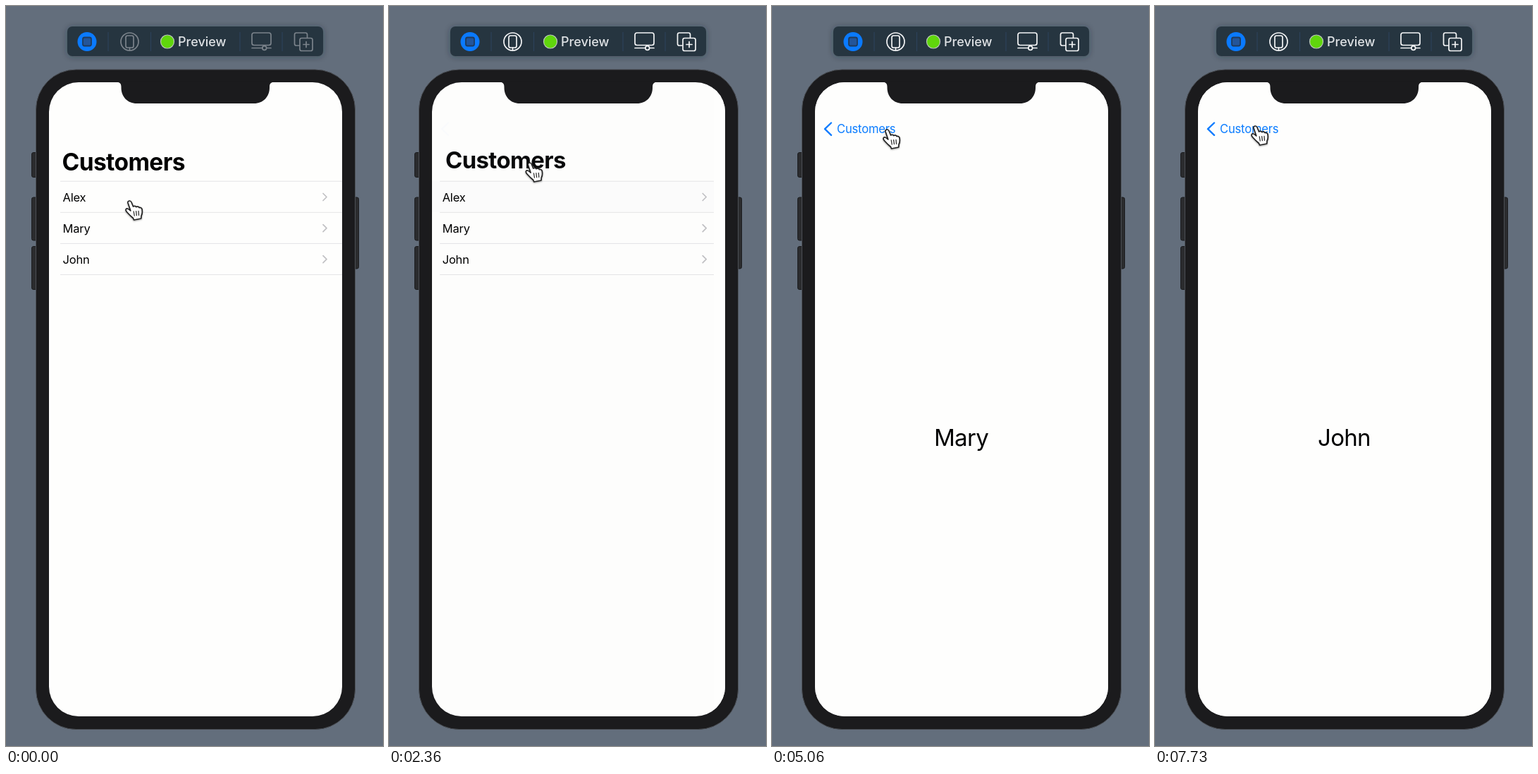
These frames come from a looping animation (535x1048 px, 8000 ms). An HTML page:

```html
<!DOCTYPE html>
<html lang="en">
<head>
<meta charset="utf-8">
<title>Customer list</title>
<style>
  html, body { margin: 0; width: 100%; height: 100%; overflow: hidden; background: #636e7c; }
  svg { display: block; width: 100%; height: 100%; }
  text { font-family: Inter, Roboto, sans-serif; }
  .line { fill: none; stroke-linecap: round; stroke-linejoin: round; }
  .row text { font-size: 16.5px; letter-spacing: -.2px; }
  .large { font-size: 33.5px; font-weight: 700; letter-spacing: -.6px; }
  .back-label { font-size: 16.6px; letter-spacing: -.2px; fill: #0a7cff; }
  .detail-name { font-size: 33px; letter-spacing: -.7px; text-anchor: middle; }
  .status { font-size: 18px; font-weight: 500; fill: #dfe2e5; }
</style>
</head>
<body>
<svg viewBox="0 0 535 1048" xmlns="http://www.w3.org/2000/svg">
  <defs>
    <clipPath id="screen"><rect x="61" y="108" width="416" height="898" rx="42"/></clipPath>
    <filter id="barShadow" x="-10%" y="-50%" width="120%" height="200%">
      <feDropShadow dx="0" dy="1" stdDeviation="5" flood-color="#1c2630" flood-opacity=".4"/>
    </filter>
    <filter id="handShadow" x="-30%" y="-30%" width="160%" height="170%">
      <feDropShadow dx="0" dy="1" stdDeviation="1" flood-opacity=".4"/>
    </filter>
  </defs>

  <rect width="535" height="1048" fill="#636e7c"/>

  <!-- toolbar -->
  <rect x="87" y="29" width="363" height="42" rx="7" fill="#28343f" filter="url(#barShadow)"/>
  <path d="M145 37V64M205.500 37V64M332 37V64M392 37V64" stroke="#2c425a" stroke-width="1.2"/>
  <circle cx="115" cy="50.500" r="13.500" fill="#0a7aff"/>
  <rect x="109" y="44.500" width="12" height="12" rx="2.500" fill="#23559a" stroke="#203b5c" stroke-width="1.800"/>
  <circle cx="229" cy="50.500" r="9.500" fill="#60d60c" stroke="#b9c6b8" stroke-width="1.200"/>
  <text class="status" x="244" y="57">Preview</text>
  <g id="icons" class="line" stroke-width="1.700">
    <circle cx="175.500" cy="50.500" r="12.500"/>
    <rect x="170" y="42" width="11" height="17" rx="2.500"/>
    <path d="M175.500 59v4"/>
    <rect x="349" y="38" width="27" height="17.500" rx="3"/>
    <path d="M349 59.500h14.500M370 59.500h6"/>
    <circle cx="366.700" cy="59.500" r="2.900"/>
    <path d="M416 56h-4a2.500 2.500 0 0 1-2.500-2.500V40.500a2.500 2.500 0 0 1 2.500-2.500h13a2.500 2.500 0 0 1 2.500 2.500v4"/>
    <rect x="417" y="45.500" width="18" height="18" rx="2.500"/>
    <path d="M422 54.500h8M426 50.500v8"/>
  </g>

  <!-- phone -->
  <g fill="#2b2c2e" stroke="#1c1d20">
    <rect x="36.500" y="207.500" width="10" height="35" rx="2.500"/>
    <rect x="36.500" y="271" width="10" height="61" rx="2.500"/>
    <rect x="36.500" y="340.500" width="10" height="61" rx="2.500"/>
    <rect x="490" y="271" width="10.500" height="101" rx="2.500"/>
  </g>
  <rect x="42.500" y="90" width="453" height="934.500" rx="57" fill="#1b1b1d" stroke="#4b4f55"/>

  <g clip-path="url(#screen)">
    <rect x="61" y="108" width="416" height="898" fill="#fefefd"/>
    <g id="list">
      <rect id="highlight" x="61" y="248" width="416" height="44" fill="#d1d1d5"/>
      <path id="separators" stroke="#e4e4e6"/>
      <g id="rows"></g>
      <rect id="dim" x="61" y="108" width="416" height="898"/>
    </g>
    <g id="detail">
      <rect x="61" y="108" width="416" height="898" fill="#fefefd"/>
      <text id="detailName" class="detail-name" x="268.500" y="622.500"></text>
    </g>
    <text id="largeTitle" class="large">Customers</text>
    <g id="back">
      <path class="line" d="M84 165.500l-9 8.700l9 8.700" stroke="#0a7cff" stroke-width="2.400"/>
      <text id="backLabel" class="back-label">Customers</text>
    </g>
  </g>
  <path fill="#1b1b1d" d="M156 107.500c5 0 7.500 2 7.500 7v1c0 13 9 22.500 22 22.500h166.500c13 0 22-9.500 22-22.500v-1c0-5 2.500-7 7.500-7z"/>

  <!-- pointer -->
  <g id="hand" class="line" filter="url(#handShadow)">
    <path fill="#fff" stroke="#222" stroke-width="1.700" d="M5 3.700C4.500.6 8.800-.1 10 3L12.500 9C13.500 8 16 8 16.800 9.600C18 8.600 20.500 9 21 10.600C22.500 10 24.800 11 25 13C25.700 17 25.700 19 24 22L23.700 26L13.500 28L12.500 25.500C9 22.500 6 19.500 3.500 16.700C1 14 2 11.500 4.500 12C6 12.300 7.500 13.800 8.800 15Z"/>
    <path stroke="#333" stroke-width="1.300" d="M13.200 16l1 6M16.600 15.700l.8 6M20 15.400l.5 6"/>
  </g>
</svg>

<script>
const LOOP = 8000;
const WIDTH = 416;
const ROW = 44.1;
const names = ["Alex", "Mary", "John"];

// When each row is tapped and its back button pressed
const visits = [
  { row: 0, tap: 560, back: 2000 },
  { row: 1, tap: 3930, back: 5360 },
  { row: 2, tap: 6860, back: Infinity }
];
const PUSH_DELAY = 40;
const POP_DELAY = 95;

// Pointer stops: time, x, y, and the easing used to arrive
const smooth = u => u * u * (3 - 2 * u);
const linear = u => u;
const easeIn = u => u * u;
const easeOut = u => 1 - (1 - u) ** 2;
const stops = [
  [0, 168, 275],
  [260, 191, 268, smooth],
  [1060, 191, 268],
  [1380, 172, 217, easeIn],
  [1660, 160.5, 179.5, easeOut],
  [2230, 160.5, 179.5],
  [2600, 271, 324, smooth],
  [2800, 271, 324],
  [3200, 289, 312.5, smooth],
  [4370, 289, 312.5],
  [4740, 164, 201, smooth],
  [5060, 156, 174, easeOut],
  [5480, 156, 174],
  [5760, 182, 347, linear],
  [6180, 264, 373, easeOut],
  [6260, 264, 363, smooth],
  [7000, 264, 363],
  [7400, 156, 204, smooth],
  [7530, 156, 204],
  [7730, 135, 169, smooth],
  [LOOP, 135, 169]
];

const el = id => document.getElementById(id);
const set = (id, attrs) => {
  for (const key in attrs) el(id).setAttribute(key, attrs[key]);
};
const mix = (a, b, u) => a + (b - a) * u;
const place = (x, y, scale = 1) => `translate(${x} ${y}) scale(${scale})`;

// Critically damped spring from 0 to 1
function spring(ms) {
  if (ms <= 0) return 0;
  const w = ms * 0.019;
  return 1 - (1 + w) * Math.exp(-w);
}

function pointerAt(t) {
  const i = Math.max(1, stops.findIndex(s => s[0] > t));
  const [t0, x0, y0] = stops[i - 1];
  const [t1, x1, y1, ease = linear] = stops[i];
  const u = ease((t - t0) / (t1 - t0));
  return [mix(x0, x1, u), mix(y0, y1, u)];
}

function buildList() {
  el("rows").innerHTML = names.map((name, i) => `
    <g class="row" transform="translate(0 ${i * ROW})">
      <text x="80.5" y="276.700">${name}</text>
      <path class="line" d="M450 265.500l5 5l-5 5" stroke="#c1c1c4" stroke-width="1.700"/>
    </g>`).join("");
  set("separators", {
    d: [0, 1, 2, 3].map(i => `M77 ${248.2 + i * ROW}H477`).join("")
  });
}

function render(t) {
  const visit = visits.findLast(v => t >= v.tap);
  const { row, tap, back } = visit || { row: 0, tap: Infinity, back: Infinity };
  const popped = spring(t - back - POP_DELAY);
  const shown = spring(t - tap - PUSH_DELAY) * (1 - popped);
  const pressed = t >= back ? 0.35 : 1;

  set("icons", { stroke: t < 560 ? "#7b838b" : "#f4f5f6" });
  set("list", { transform: place(-0.3 * WIDTH * shown, 0) });
  set("highlight", { y: 248 + row * ROW, opacity: visit ? 1 - popped : 0 });
  set("dim", { opacity: 0.1 * shown });
  set("detail", { transform: place(WIDTH * (1 - shown), 0) });
  el("detailName").textContent = names[row];

  const x = mix(79.5, 92, shown);
  const y = mix(232.5, 180, shown);
  set("largeTitle", { transform: place(x, y, mix(1, 0.48, shown)), opacity: 1 - shown });
  set("backLabel", { transform: place(x, y, mix(2.08, 1, shown)) });
  set("back", { opacity: shown * pressed });
  set("hand", { transform: place(...pointerAt(t)) });
}

buildList();
const start = performance.now();
function tick(now) {
  render(Math.max(0, now - start) % LOOP);
  requestAnimationFrame(tick);
}
render(0);
requestAnimationFrame(tick);
</script>
</body>
</html>
```
